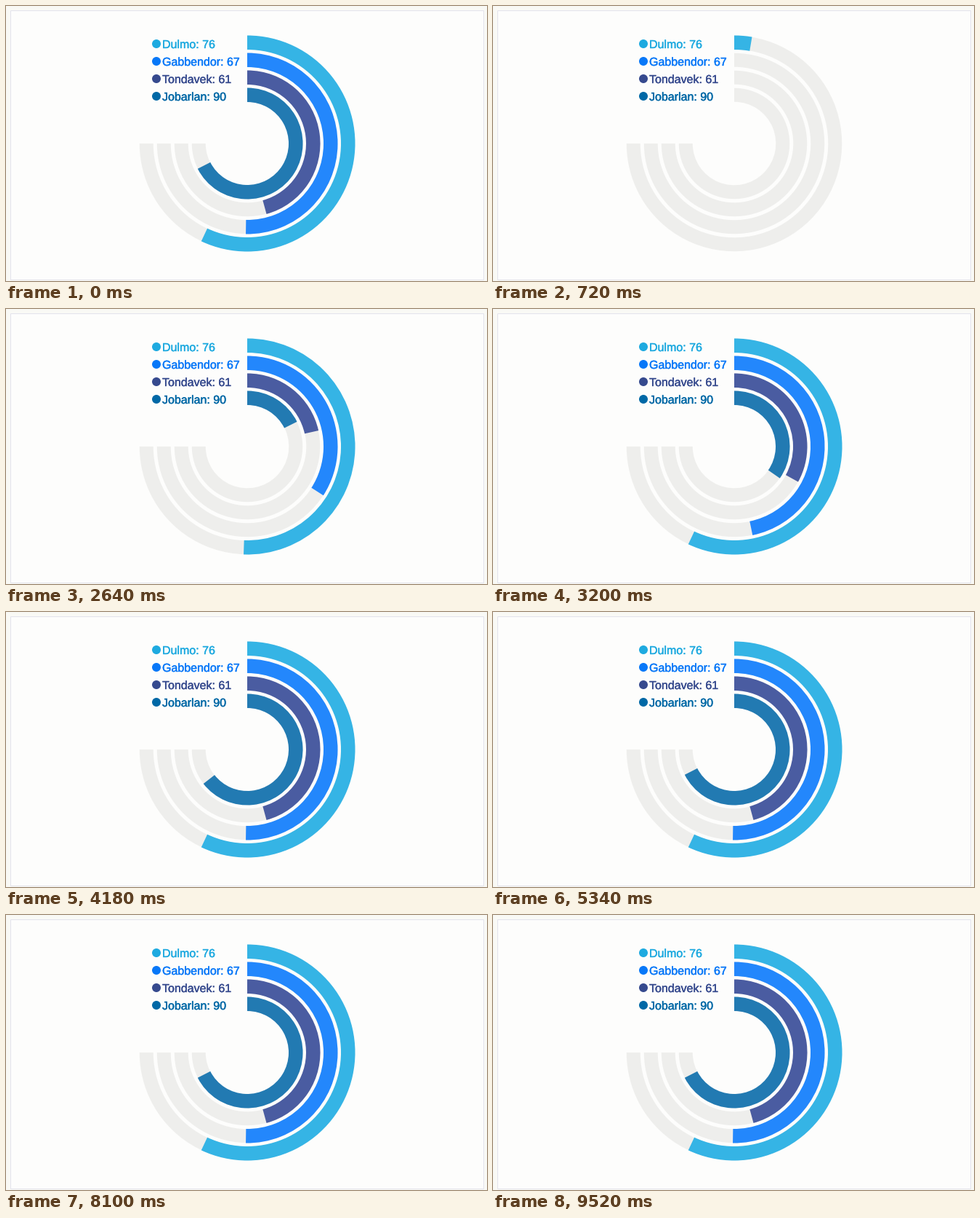
Recreate the animation shown at these times as a matplotlib script. Size 662x378 px, loop 9.54 s.

```python
import matplotlib.pyplot as plt
import numpy as np
from matplotlib.animation import FuncAnimation
from matplotlib.patches import Circle, Rectangle, Wedge
from matplotlib.patheffects import withStroke

W, H, DPI = 662, 378, 100
LOOP, TICK = 9540, 20
CX, CY = 332, 189
MIDDLE, PITCH, BAND = 138.75, 24, 19.5
SWEEP = 270
STAGGER = 1 / 4.8
RESTART, BEGIN, GROWTH = 13, 13.8, 47.6

# label, value, arc colour, legend colour
SERIES = [
    ("Dulmo", 76, "#35b4e5", "#1eaae0"),
    ("Gabbendor", 67, "#2387fc", "#0878f8"),
    ("Tondavek", 61, "#4a5ca1", "#364a8e"),
    ("Jobarlan", 90, "#227ab2", "#0068a6"),
]

PAGE, CARD, BORDER, TRACK = "#f9f9f5", "#fdfdfc", "#e3e3ec", "#eeeeec"


def px(n):
    """Pixels to points."""
    return n * 72 / DPI


def ring(i, angle, width, color, z):
    r = MIDDLE - i * PITCH + width / 2
    wedge = Wedge((CX, CY), r, -90, -90 + angle, width=width,
                  fc=color, ec="none", zorder=z)
    return ax.add_patch(wedge)


def step_at(ms):
    """The picture steps at 0, 20 and 120 ms of every 140 ms."""
    cycle, rest = divmod(ms, 140)
    return 3 * cycle + (rest >= 20) + (rest >= 120)


def progress(step):
    """Time since the restart, in units of one bar's growth."""
    return 2 if step < RESTART else (step - BEGIN) / GROWTH


fig = plt.figure(figsize=(W / DPI, H / DPI), dpi=DPI, facecolor=PAGE)
ax = fig.add_axes([0, 0, 1, 1])
ax.set_xlim(0, W)
ax.set_ylim(H, 0)
ax.axis("off")

ax.add_patch(Rectangle((5.5, 5.5), 651, 370, fc=CARD, ec=BORDER, lw=px(1)))

bars = []
for i, (label, value, fill, ink) in enumerate(SERIES):
    y = 52 + i * PITCH
    ring(i, SWEEP, BAND * 0.97, TRACK, 2)
    bars.append(ring(i, SWEEP * value / 100, BAND, fill, 3))
    ax.add_patch(Circle((207, y), 6, fc=ink, ec="none", zorder=4))
    ax.text(215, y + 6, f"{label}: {value}", color=ink, fontsize=px(16),
            family="Liberation Sans", va="baseline", zorder=4,
            path_effects=[withStroke(linewidth=px(0.4), foreground=ink)])


def draw(frame):
    p = progress(step_at(frame * TICK))
    for i, (bar, row) in enumerate(zip(bars, SERIES)):
        grown = np.clip(p - i * STAGGER, 0, 1)
        bar.set_visible(grown > 0)
        bar.set_theta2(-90 + SWEEP * row[1] / 100 * grown)
    return bars


anim = FuncAnimation(fig, draw, frames=LOOP // TICK, interval=TICK,
                     repeat=True, repeat_delay=0, blit=False)
plt.show()
```
